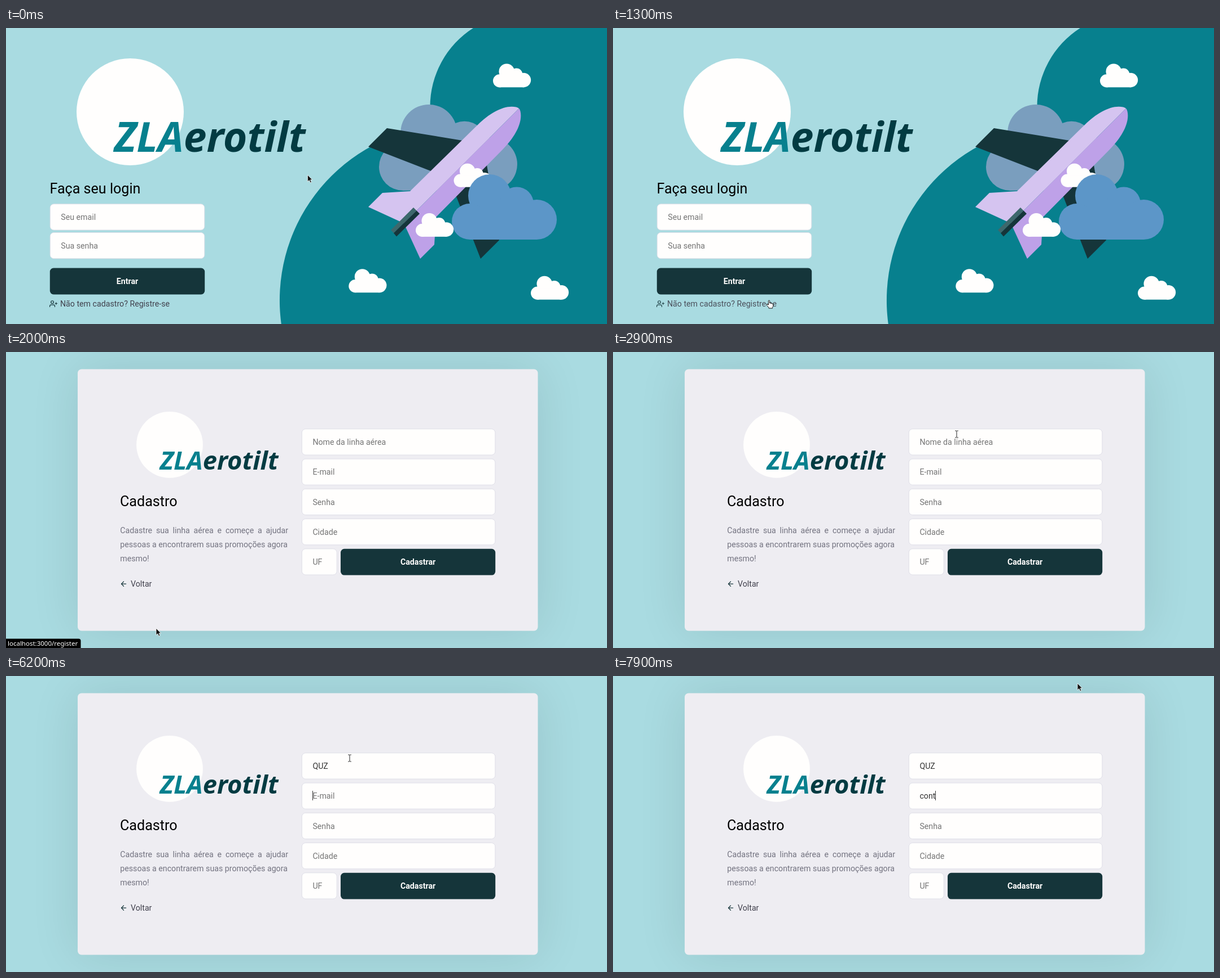
Write an HTML page that moves like this. It is 1065 by 526 pixels and loops after 8000 ms.

```html
<!DOCTYPE html>
<html lang="pt-BR">
<head>
<meta charset="utf-8">
<title>Login e cadastro</title>
<style>
  html, body { margin: 0; width: 100%; height: 100%; overflow: hidden; background: #a9dbe1; }
  svg { display: block; width: 100%; height: 100%; }
  text { font: 14.2px Roboto, sans-serif; white-space: pre; }
  .brand { font: italic 700 73px "Open Sans", "Noto Sans", sans-serif; fill: #023b42; }
  .title { font-size: 25.1px; }
  .hint { fill: #757575; }
  .typed { fill: #333; }
  .copy { fill: #737380; }
  .link { fill: #41414d; }
  .icon { fill: none; stroke: #15353a; stroke-width: 2; stroke-linecap: round; stroke-linejoin: round; }
  .label { font-weight: 700; fill: #fffefd; text-anchor: middle; }
  .box { fill: #fffefd; stroke: #dcdce6; stroke-width: .9; }
  .dark { fill: #15353a; }
  .url { font: 11.5px "Noto Sans", sans-serif; fill: #fff; }
</style>
</head>
<body>
<svg viewBox="0 0 1065 526" preserveAspectRatio="none">
  <defs>
    <filter id="blur" x="-30%" y="-50%" width="160%" height="200%">
      <feGaussianBlur stdDeviation="44.4"/>
    </filter>
    <g id="cloud">
      <circle cx="67" cy="38" r="38"/>
      <circle cx="115" cy="52.5" r="30"/>
      <circle cx="32" cy="84" r="32"/>
      <circle cx="150.5" cy="80.5" r="35.5"/>
      <rect x="32" y="60" width="118.5" height="56"/>
    </g>
    <g id="logo">
      <circle cx="220" cy="149" r="95" fill="#fffefd"/>
      <text class="brand" x="192" y="220"><tspan fill="#07808e">ZLA</tspan>erotilt</text>
    </g>
  </defs>

  <g id="login">
    <path fill="#07808e" d="M828 0A166.4 166.4 0 0 0 751.5 140V175.3A312 312 0 0 0 487.8 526H1065V0Z"/>
    <use href="#cloud" transform="translate(661 136) scale(1.317)" fill="#7a9ebe"/>
    <path class="dark" d="M642 211L675 178L815 201L755 255ZM841 410L874 377L851 237L797 297Z"/>
    <path fill="#d5c4f0" d="M642 318L667 293L716 290L836 172C858 150 884 136 904 140.5Q908 141.5 909 143L705 347Z"/>
    <path fill="#bea1e8" d="M734 410L759 385L762 336L880 216C902 194 916 168 911.5 148Q910.5 144 909 143L705 347Z"/>
    <path fill="#3d686c" d="M682 359L722 319L727.5 324.5L687 364.5Z"/>
    <path class="dark" d="M687 364.5L727.5 324.5L733 330L692 370.5Z"/>
    <g id="puffs" fill="#fffefd"></g>
    <use href="#cloud" transform="translate(790 260)" fill="#5c96c8"/>
    <use href="#cloud" transform="translate(726 329) scale(.361)" fill="#fffefd"/>

    <use href="#logo"/>
    <text class="title" x="77.5" y="294">Faça seu login</text>
    <g id="loginForm"></g>
    <g id="register">
      <g class="icon" transform="translate(77 483) scale(.592)">
        <path d="M16 21v-2a4 4 0 0 0-4-4H5a4 4 0 0 0-4 4v2M20 8v6M23 11h-6"/>
        <circle cx="8.5" cy="7" r="4"/>
      </g>
      <text class="link" x="96" y="495">Não tem cadastro? Registre-se</text>
    </g>
  </g>

  <g id="signup">
    <rect x="127" y="30.5" width="815.5" height="465" rx="7" opacity=".1" filter="url(#blur)"/>
    <rect x="127" y="30.5" width="815.5" height="465" rx="7" fill="#eeedf2"/>
    <use href="#logo" transform="translate(153.6 72.5) scale(.62)"/>
    <text class="title" x="202" y="274">Cadastro</text>
    <text class="copy" x="202.3" y="322.4" word-spacing="3.27">Cadastre sua linha aérea e começe a ajudar</text>
    <text class="copy" x="202.3" y="347.3">pessoas a encontrarem suas promoções agora</text>
    <text class="copy" x="202.3" y="372.2">mesmo!</text>
    <path class="icon" transform="translate(201.4 405) scale(.592)" d="M19 12H5M12 19l-7-7 7-7"/>
    <text class="link" x="221" y="417">Voltar</text>
    <g id="signupForm"></g>
    <rect id="caret" width="1" height="17" fill="#333"/>
  </g>

  <g id="status">
    <path d="M0 509.5H128.5Q132.5 509.5 132.5 513.5V526H0Z"/>
    <text class="url" x="3" y="522">localhost:3000/register</text>
  </g>

  <g id="pointer" stroke-linejoin="round">
    <path id="arrow" d="M0 0V12.2L2.9 9.6L4.9 14L7 13.1L5.1 8.8H8.6Z" fill="#111" stroke="#fff" stroke-width=".8"/>
    <path id="hand" d="M-1.6 8V1.2Q-1.5 0 -.5 0Q.6 0 .7 1.2V5Q2 4.3 2.8 5.5Q4 4.8 4.8 5.9Q6.6 5.4 6.8 7.2V9.5Q6.6 11.5 5.6 12.6V14H-1V12.8L-4.7 8.5Q-5 7 -3.6 6.8Z" fill="#fff" stroke="#111"/>
    <g id="beam" fill="none">
      <path stroke="#fff" stroke-width="2.4" d="M-2.8 -6H2.8M0 -6V6M-2.8 6H2.8"/>
      <path stroke="#222" d="M-2.8 -6H-.6L0 -5.4L.6 -6H2.8M0 -5.4V5.4M-2.8 6H-.6L0 5.4L.6 6H2.8"/>
    </g>
  </g>
</svg>
<script>
const LOOP = 8000, STEP = 100, TEXT_X = 543.3;
const $ = id => document.getElementById(id);
const show = (el, on) => { el.style.display = on ? '' : 'none'; };

function add(parent, tag, attrs, text = '') {
  const el = document.createElementNS('http://www.w3.org/2000/svg', tag);
  for (const k in attrs) el.setAttribute(k, attrs[k]);
  el.textContent = text;
  return parent.appendChild(el);
}

function field(parent, x, y, width, hint) {
  add(parent, 'rect', { class: 'box', x, y, width, height: 46.2, rx: 6.5 });
  return add(parent, 'text', { class: 'hint', x: x + 19.1, y: y + 28.3 }, hint);
}

function button(parent, x, y, width, label) {
  add(parent, 'rect', { class: 'dark', x, y, width, height: 46.8, rx: 6.5 });
  add(parent, 'text', { class: 'label', x: x + width / 2, y: y + 28.2 }, label);
}

for (const [x, y] of [[863, 63.5], [607.3, 428.3], [930, 440.8], [793.5, 240.8]])
  add($('puffs'), 'use', { href: '#cloud', transform: `translate(${x} ${y}) scale(.361)` });

field($('loginForm'), 78.2, 312.8, 273.6, 'Seu email');
field($('loginForm'), 78.2, 363.5, 273.6, 'Sua senha');
button($('loginForm'), 77.8, 426.6, 274.4, 'Entrar');

const hints = ['Nome da linha aérea', 'E-mail', 'Senha', 'Cidade', 'UF'];
const inputs = hints.map((hint, i) =>
  field($('signupForm'), 524.3, 136.8 + i * 53.25, i < 4 ? 342.6 : 62, hint));
button($('signupForm'), 593, 349.8, 274.2, 'Cadastrar');

// Typing: [time, text], one list per input
const typing = [
  [[3800, 'Q'], [4000, 'QU'], [4200, 'QUZ']],
  [[7300, 'c'], [7500, 'co'], [7600, 'con'], [7900, 'cont']]
];

// Caret: [from, to, input]
const carets = [[3500, 4900, 0], [6200, 6700, 1], [7300, LOOP, 1]];

// Pointer: [time, x, y, shape]
const track = [
  [0, 534.4, 261, 'arrow'], [500, 534.4, 261, 'arrow'], [900, 394, 368, 'arrow'],
  [1000, 394, 368, 'arrow'], [1300, 277, 484, 'hand'], [1700, 266, 491, 'hand'],
  [1900, 266, 491, 'arrow'], [2800, 266, 491, 'arrow'], [2900, 609, 146, 'beam'],
  [6400, 609, 146, 'beam'], [6500, 640, 223, 'beam'], [6700, 752, 92, 'arrow'],
  [6900, 823, 13, 'arrow'], [LOOP, 823, 13, 'arrow']
];

function movePointer(t) {
  const next = track.findIndex(k => k[0] > t);
  const a = track[next - 1], b = track[next];
  const p = (t - a[0]) / (b[0] - a[0]);
  const mix = n => a[n] + (b[n] - a[n]) * p;
  $('pointer').setAttribute('transform', `translate(${mix(1)} ${mix(2)})`);
  for (const id of ['arrow', 'hand', 'beam']) show($(id), a[3] === id);
}

function render(time) {
  const t = Math.floor(time / STEP) * STEP;
  show($('login'), t < 2000);
  show($('signup'), t >= 2000);
  show($('status'), t >= 1400 && t < 2900);
  $('register').setAttribute('opacity', 1 - .2 * Math.min(1, Math.max(0, (t - 1200) / 200)));

  typing.forEach((keys, i) => {
    const key = keys.filter(k => k[0] <= t).pop();
    inputs[i].textContent = key ? key[1] : hints[i];
    inputs[i].setAttribute('class', key ? 'typed' : 'hint');
  });

  const caret = carets.find(([from, to]) => t >= from && t < to);
  show($('caret'), caret);
  if (caret) {
    const el = inputs[caret[2]];
    const w = el.getAttribute('class') === 'typed' ? el.getComputedTextLength() : 0;
    $('caret').setAttribute('x', Math.floor(TEXT_X + w));
    $('caret').setAttribute('y', 151 + 53 * caret[2]);
  }
  movePointer(t);
}

const start = performance.now();
function tick() {
  render(Math.max(0, performance.now() - start) % LOOP);
  requestAnimationFrame(tick);
}
tick();
</script>
</body>
</html>
```
